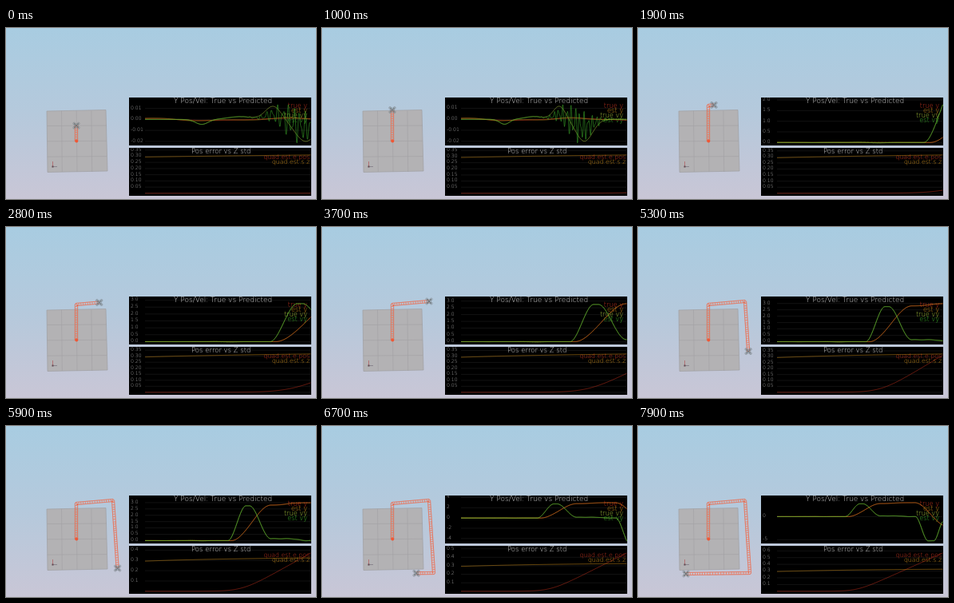
Write an HTML page with a canvas that moves like this. It is 388 px wide and 214 px high and loops after 8 s.

```html
<!DOCTYPE html>
<html lang="en">
<head>
<meta charset="utf-8">
<title>Drone flight with estimator plots</title>
<style>
html, body { margin: 0; width: 100%; height: 100%; overflow: hidden; background: #b6cadc; }
canvas { display: block; width: 388px; height: 214px; }
</style>
</head>
<body>
<canvas id="stage"></canvas>
<script>
const W = 388, H = 214, LOOP = 8000, STEP = 100;
const HISTORY = 3.3; // seconds already plotted when the loop starts
const canvas = document.getElementById('stage');
const ratio = window.devicePixelRatio || 1;
canvas.width = W * ratio;
canvas.height = H * ratio;
const ctx = canvas.getContext('2d');
ctx.scale(ratio, ratio);

const RED = '#c43420', ORANGE = '#cf901e', LIME = '#a8c43c', GREEN = '#3cac2a';

const clamp = u => Math.min(1, Math.max(0, u));
const ease = u => u * u * (3 - 2 * u);
const ramp = (x, from, to) => ease(clamp((x - from) / (to - from)));
const bell = (x, mid, width) => Math.exp(-(((x - mid) / width) ** 2));

// Signals by plotted time in seconds: hover, sidestep, hover, fast return.
const drift = s => .0025 * bell(s, 1.9, .35) - .0045 * bell(s, 1.13, .18);
const sway = s => .012 * bell(s, 2.55, .22) - .02 * bell(s, 3.2, .3);
const manoeuvre = s => 2.75 * (ramp(s, 4.6, 5.6) - ramp(s, 5.8, 7))
  + .15 * (ramp(s, 6.4, 7) - ramp(s, 8, 9))
  - 5.2 * ramp(s, 9.35, 10.2) + 4.2 * ramp(s, 10.6, 11.25);
const jitter = s => bell(s, 3, .5) * (.011 * Math.sin(57 * s + 2) + .006 * Math.sin(91 * s));

const trueVy = s => drift(s) + sway(s) + manoeuvre(s);
const estVy = s => drift(s) + .35 * sway(s) + jitter(s) + manoeuvre(s)
  + .03 * ramp(s, 6, 7) * Math.sin(9 * s);
const trueY = s => 2.8 * ramp(s, 4.8, 7) + .2 * ramp(s, 6.8, 9) - 5.1 * ramp(s, 9.3, 11.5)
  + .001 * Math.sin(2 * s + 2);
const estY = s => trueY(s) + .0006 * Math.sin(5 * s) + .02 * ramp(s, 5, 6) * Math.sin(4 * s);
const posError = s => .049 * Math.log(1 + Math.exp((s - 5.4) / .5));
const zStd = s => .293 + .03 * (1 - Math.exp(-s / 5)) + .0007 * s;

const plots = [
  { top: 87, title: 'Y Pos/Vel: True vs Predicted', titleX: 210, titleY: 93.5, titleSize: 9,
    legendX: 377, legendY: 100, legendSize: 8.2, showZero: true,
    series: [['true y', RED, trueY], ['est y', ORANGE, estY],
      ['true vy', LIME, trueVy], ['est vy', GREEN, estVy]] },
  { top: 150, title: 'Pos error vs Z std', titleX: 232, titleY: 157, titleSize: 8.5,
    legendX: 380, legendY: 163.5, legendSize: 7.8, showZero: false,
    series: [['quad.est.e.pos', RED, posError], ['quad.est.s.z', ORANGE, zStd]] }
];

// Corners of the flight: arrival time in ms, then x and y.
const CORNERS = [[-1200, 88, 142], [1450, 88, 97], [3700, 134, 93], [6150, 140, 184],
  [7900, 60, 185]];

function flight(t) {
  let i = 0;
  while (i < CORNERS.length - 2 && t > CORNERS[i + 1][0]) i++;
  const [t0, x0, y0] = CORNERS[i], [t1, x1, y1] = CORNERS[i + 1];
  const u = clamp((t - t0) / (t1 - t0)), k = (u + ease(u)) / 2;
  return [x0 + (x1 - x0) * k, y0 + (y1 - y0) * k];
}

function line(points, color, width = 1) {
  ctx.beginPath();
  points.forEach(([x, y]) => ctx.lineTo(x, y));
  ctx.strokeStyle = color;
  ctx.lineWidth = width;
  ctx.stroke();
}

function label(text, x, y, size, color, align = 'left') {
  ctx.font = `200 ${size}px "DejaVu Sans", sans-serif`;
  ctx.textAlign = align;
  ctx.fillStyle = color;
  ctx.fillText(text, x, y);
}

function drawScene() {
  const sky = ctx.createLinearGradient(0, 0, 0, H);
  sky.addColorStop(0, '#a8cce1');
  sky.addColorStop(.5, '#b5c9dc');
  sky.addColorStop(1, '#c9c6d6');
  ctx.fillStyle = sky;
  ctx.fillRect(0, 0, W, H);

  ctx.beginPath();
  [[51, 104], [125, 102.5], [127, 179], [52, 180.5]].forEach(([x, y]) => ctx.lineTo(x, y));
  ctx.closePath();
  ctx.fillStyle = '#b3b2b4';
  ctx.fill();
  ctx.strokeStyle = '#a09fa2';
  ctx.lineWidth = .7;
  ctx.stroke();
  for (let i = 0; i < 3; i++) {
    const x = 69.5 + 18.7 * i, y = 122 + 19.3 * i;
    line([[x, 103.5], [x + .8, 180]], '#a1a0a3', .6);
    line([[51.5, y + .5], [126, y]], '#a1a0a3', .6);
  }
  line([[58.5, 174], [58.5, 167]], '#b06468', .8);
  line([[58.5, 173.5], [64, 173.5]], '#807c84', .8);
  ctx.fillStyle = '#604850';
  ctx.fillRect(57.5, 172.5, 2, 2);
}

function drawTrail(now) {
  const left = [], right = [], rungs = [];
  let [lastX, lastY] = flight(-1200), run = 0;
  for (let t = -1180; t <= now; t += 20) {
    const [x, y] = flight(t);
    const dx = x - lastX, dy = y - lastY, d = Math.hypot(dx, dy);
    if (d < .05) continue;
    const nx = -dy / d * 1.6, ny = dx / d * 1.6;
    left.push([x + nx, y + ny]);
    right.push([x - nx, y - ny]);
    run += d;
    if (run > 2.6) {
      run = 0;
      rungs.push([[x + nx, y + ny], [x - nx, y - ny]]);
    }
    [lastX, lastY] = [x, y];
  }
  line(left, '#ee6244', .9);
  line(right, '#ee6244', .9);
  rungs.forEach(r => line(r, '#ee7858', .8));
  ctx.fillStyle = '#ee5836';
  ctx.beginPath();
  ctx.arc(88.3, 141.5, 2, 0, 7);
  ctx.fill();
}

function drawDrone(now) {
  ctx.save();
  ctx.translate(...flight(now));
  ctx.fillStyle = 'rgba(120,126,130,.45)';
  ctx.fillRect(-3, -3, 6, 6);
  line([[-3, -3], [3, 3]], '#667074', .9);
  line([[-3, 3], [3, -3]], '#667074', .9);
  for (const x of [-2.8, 2.8]) for (const y of [-2.6, 2.6]) {
    ctx.beginPath();
    ctx.arc(x, y, 1.4, 0, 7);
    ctx.strokeStyle = '#7c8488';
    ctx.lineWidth = .6;
    ctx.stroke();
  }
  ctx.restore();
}

function tickStep(range) {
  const unit = 10 ** Math.floor(Math.log10(range)), m = range / unit;
  return unit * (m < 2 ? .2 : m < 4 ? .5 : m < 8 ? 1 : m < 9.5 ? 2 : 5);
}

function drawPlot(plot, now) {
  const end = HISTORY + now / 1000, count = 420;
  const { top } = plot, height = 60, x0 = 174, x1 = 381.5;
  const data = plot.series.map(([, , f]) =>
    Array.from({ length: count + 1 }, (_, i) => f(end * i / count)));
  const all = data.flat();
  const max = Math.max(...all, 0), min = Math.min(...all, 0), range = max - min;
  const hi = max + .14 * range, lo = min - .07 * range;
  const toY = v => top + 2.2 + (hi - v) / (hi - lo) * (height - 2);

  ctx.save();
  ctx.beginPath();
  ctx.rect(154, top, 228, height);
  ctx.clip();
  ctx.fillStyle = '#000';
  ctx.fillRect(154, top, 228, height);

  const step = tickStep(hi - lo);
  const digits = Math.max(0, -Math.floor(Math.log10(step) + 1e-9));
  for (let k = Math.ceil(lo / step); k * step <= hi; k++) {
    const y = toY(k * step);
    line([[x0, y], [x1, y]], '#1b1b1b', .7);
    if (plot.showZero || k > 0) label((k * step).toFixed(digits), 156, y + .9, 6.1, '#b4b4b4');
  }

  label(plot.title, plot.titleX, plot.titleY, plot.titleSize, '#d6d6d6');
  plot.series.forEach(([name, color], i) =>
    label(name, plot.legendX, plot.legendY + i * 6, plot.legendSize, color, 'right'));
  ctx.globalAlpha = .85;
  data.forEach((values, i) => line(
    values.map((v, j) => [x0 + (x1 - x0) * j / count, toY(v)]), plot.series[i][1], .65));
  ctx.restore();
}

function draw(time) {
  const now = Math.floor(time % LOOP / STEP) * STEP;
  drawScene();
  drawTrail(now);
  drawDrone(now);
  plots.forEach(p => drawPlot(p, now));
}

const start = performance.now();
function tick() {
  draw(performance.now() - start);
  requestAnimationFrame(tick);
}
tick();
</script>
</body>
</html>
```
